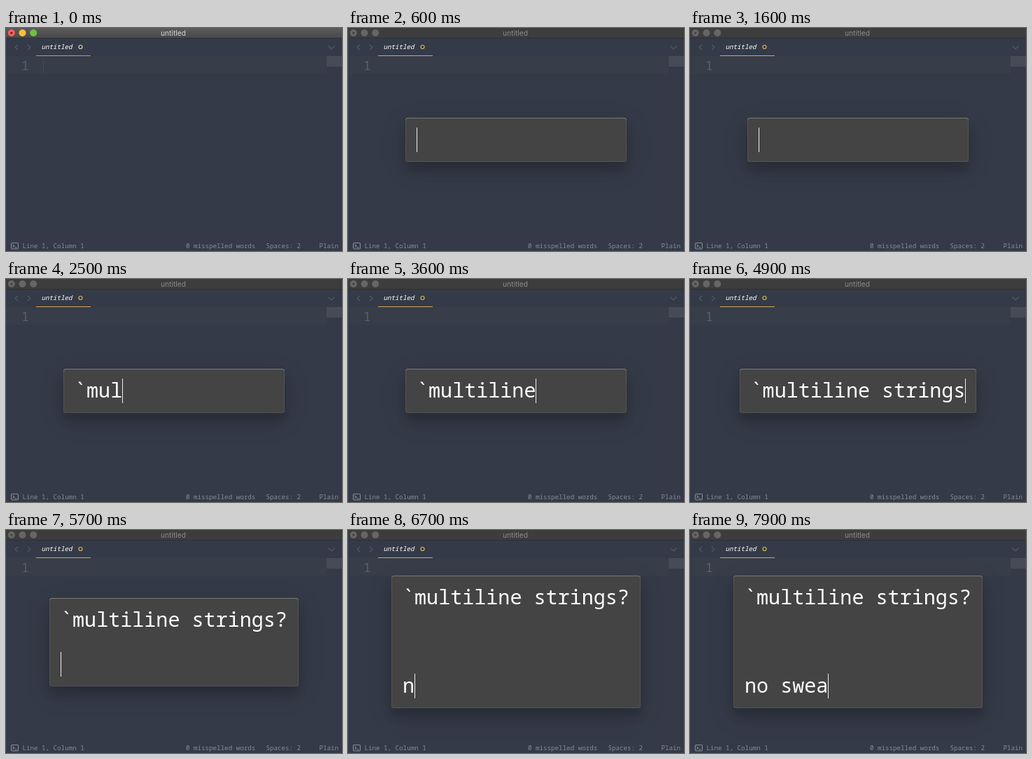
These frames come from a looping animation (480 by 318 pixels, 8000 ms). An HTML page:

```html
<!DOCTYPE html>
<html lang="en">
<head>
<meta charset="utf-8">
<title>untitled</title>
<style>
html, body { margin: 0; width: 100%; height: 100%; overflow: hidden; background: #343a47; }
#stage { position: relative; width: 480px; height: 318px; overflow: hidden; }
svg { position: absolute; display: block; }
svg text, #box { font-family: "Noto Sans Mono", "DejaVu Sans Mono", monospace; }
svg .title { font: 10.2px Inter, "Open Sans", sans-serif; fill: #d8d8d8; }
.status { font-size: 9.2px; fill: #868c97; }
.line { fill: none; stroke: #525864; stroke-width: 1.1; }
.off .bar { fill: #3d3d3d; }
.off .title { fill: #8c8c8c; }
.off .light { fill: #666; }
.off .mark { fill: #414141; }
.off .caret { display: none; }
.tab { fill: #a99c7e; }
.ring { fill: none; stroke: #e3d3a2; stroke-width: 1.2; }
.off .tab { fill: #d3a653; }
.off .ring { stroke: #dcb34e; }
#box {
  position: absolute; box-sizing: border-box; background: #444; border-radius: 4px;
  box-shadow: inset 0 1px #7b7a75, inset 0 0 0 1px #535353,
    0 12px 12px rgba(0, 0, 0, .13), 0 10px 36px rgba(0, 0, 0, .15);
  font-size: 28.42px; font-weight: 500; line-height: 63px; color: #fff; white-space: pre;
}
#text { position: absolute; left: 16px; top: -1px; }
#caret { position: absolute; width: 1px; height: 35px; background: #eee; }
</style>
</head>
<body>
<div id="stage">
  <svg id="editor" width="480" height="318">
    <defs>
      <linearGradient id="metal" x2="0" y2="1">
        <stop stop-color="#5b5b5b"/><stop offset="1" stop-color="#494949"/>
      </linearGradient>
    </defs>
    <rect width="480" height="318" fill="#343a47"/>
    <rect class="bar" width="480" height="14" fill="url(#metal)"/>
    <rect y="14" width="480" height="1" fill="#2d3037"/>
    <circle class="light" cx="7.800" cy="7" r="5" fill="#fb6158"/>
    <circle class="mark" cx="7.800" cy="7" r="1.6" fill="#7c150f"/>
    <circle class="light" cx="23.500" cy="7" r="5" fill="#f9be3d"/>
    <circle class="light" cx="39.200" cy="7" r="5" fill="#6fc144"/>
    <text class="title" x="239" y="11" text-anchor="middle">untitled</text>

    <path class="line" d="M17 24l-4 3.500 4 3.500M31 24l4 3.500-4 3.500M460.500 25.500l4.500 4.500 4.500-4.500"/>
    <text x="50.500" y="30.300" font-size="9.2" font-style="italic" font-weight="500" fill="#fff">untitled</text>
    <circle class="ring" cx="106.500" cy="27" r="2.500"/>
    <rect class="tab" x="43" y="39" width="78" height="1"/>

    <rect y="40" width="458" height="25" fill="#383d4a"/>
    <rect x="458" y="40" width="22" height="15" fill="#474b57"/>
    <text x="22" y="60" font-size="18" fill="#5a606c">1</text>
    <rect class="caret" x="53" y="46" width="1" height="18" fill="#474b55"/>

    <rect class="line" x="7.500" y="306.500" width="10" height="8.500" rx="1.500" style="stroke:#868c97"/>
    <path class="line" d="M9.500 308.700l2.300 2-2.300 2M12.500 313h3" style="stroke:#868c97"/>
    <g class="status">
      <text x="23.500" y="314">Line 1, Column 1</text>
      <text x="257" y="314">0 misspelled words</text>
      <text x="371.500" y="314">Spaces: 2</text>
      <text x="447.500" y="314">Plain</text>
    </g>
  </svg>
  <div id="box"><span id="text"></span><div id="caret"></div></div>
</div>
<script>
const LOOP = 8000, OPEN = 100, READY = 600, ADVANCE = 17.05, LINE = 63, PAD = 16;
const message = "`multiline strings?\n\nno swea";
// [time in ms, characters typed so far]
const keys = [
  [READY, 0], [1900, 1], [2200, 2], [2400, 3], [2500, 4], [2800, 6], [3200, 7],
  [3400, 8], [3500, 9], [3600, 10], [3800, 11], [4000, 12], [4200, 13], [4400, 14],
  [4600, 16], [4700, 17], [4900, 18], [5300, 19], [5700, 20], [5800, 21],
  [6700, 22], [6900, 23], [7000, 24], [7200, 25], [7500, 26], [7600, 27], [7900, 28]
];
const [editor, box, text, caret] =
  ["editor", "box", "text", "caret"].map(id => document.getElementById(id));

function draw(t) {
  const [since, count] = keys.filter(k => k[0] <= t).pop() || [t, 0];
  const typed = message.slice(0, count);
  const lines = typed.split("\n");
  const width = Math.max(316, PAD * 2 + ADVANCE * Math.max(...lines.map(l => l.length)));
  const height = LINE * lines.length;

  editor.classList.toggle("off", t >= OPEN);
  const fade = Math.min(1, Math.max(0, (t - OPEN + 100) / 400));
  box.style.opacity = t < OPEN ? 0 : 1 - (1 - fade) ** 2;
  box.style.left = 240 - width / 2 + "px";
  box.style.top = Math.floor(160 - height / 2) + "px";
  box.style.width = width + "px";
  box.style.height = height + "px";
  text.textContent = typed;

  caret.style.left = PAD - 0.5 + ADVANCE * lines[lines.length - 1].length + "px";
  caret.style.top = height - LINE + 14 + "px";
  caret.style.visibility = (t - since) % 1000 < 500 ? "visible" : "hidden";
}

const start = performance.now();
function tick() {
  draw((performance.now() - start) % LOOP);
  requestAnimationFrame(tick);
}
tick();
</script>
</body>
</html>
```
